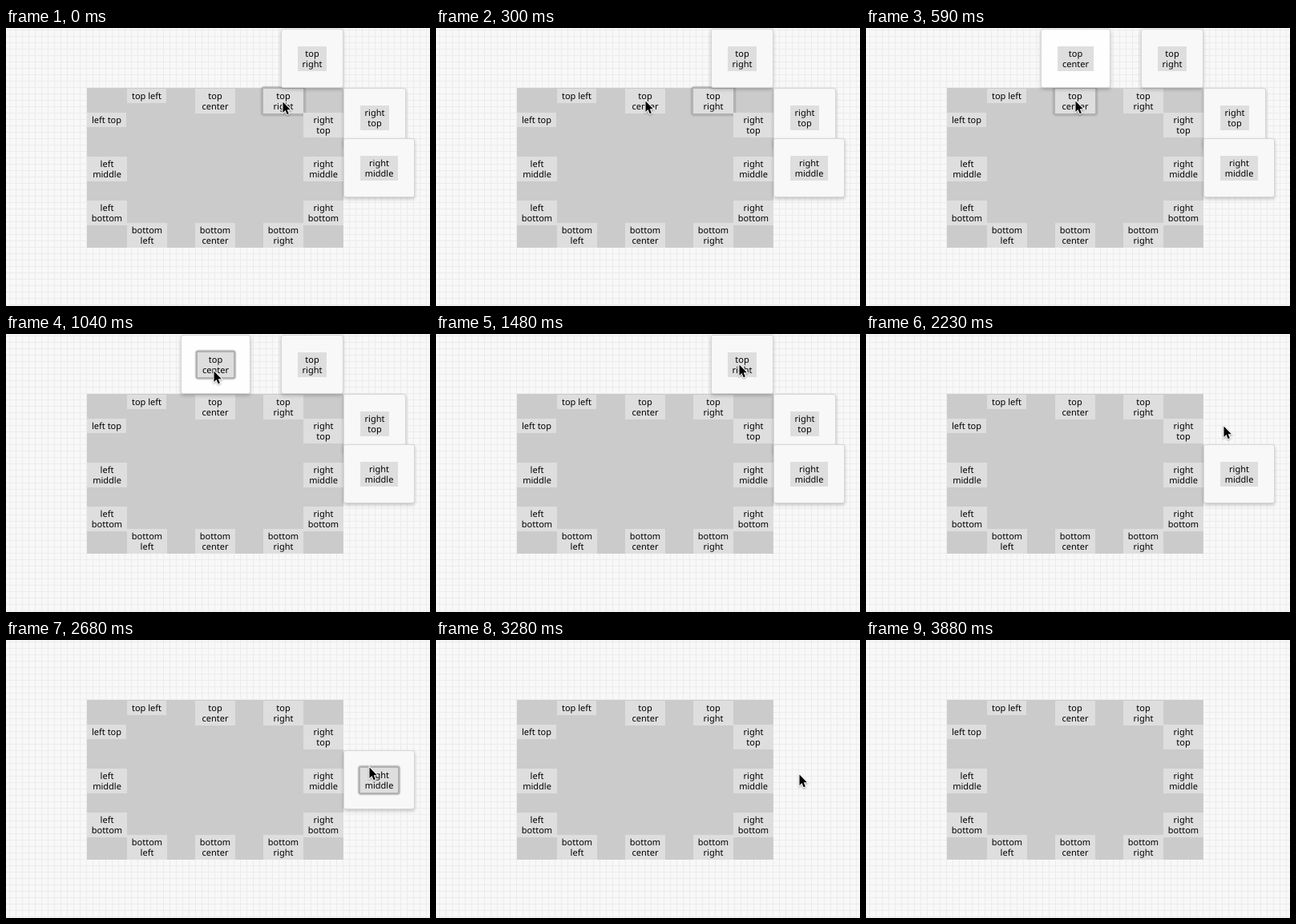
An HTML page with a canvas that plays this animation: 529 by 348 pixels, repeating every 4.18 s.

```html
<!DOCTYPE html>
<html lang="en">
<head>
<meta charset="utf-8">
<title>Popover placement</title>
<style>
  html, body { margin: 0; width: 100%; height: 100%; overflow: hidden; background: #f8f8f8; }
  canvas { display: block; }
</style>
</head>
<body>
<canvas id="stage" width="529" height="348"></canvas>
<script>
const ctx = document.getElementById('stage').getContext('2d');
const WIDTH = 529, HEIGHT = 348, LOOP = 4180, GRID = 8;

// label, x, y, width
const buttons = [
  ['top left', 151, 76, 49], ['top center', 236, 76, 50], ['top right', 321, 76, 50],
  ['left top', 101, 106, 49], ['left middle', 101, 161, 50], ['left bottom', 101, 216, 50],
  ['right top', 371, 106, 50], ['right middle', 371, 161, 50], ['right bottom', 371, 216, 50],
  ['bottom left', 151, 244, 50], ['bottom center', 236, 244, 50], ['bottom right', 321, 244, 50]
];

const popovers = [
  { label: 'top center', x: 218, y: 1, width: 87, from: 590, to: 1180, fill: '#fefefe' },
  { label: 'top right', x: 343, y: 1, width: 78, from: 0, to: 1630 },
  { label: 'right top', x: 421, y: 75, width: 78, from: 0, to: 2230 },
  { label: 'right middle', x: 421, y: 138, width: 89, from: 0, to: 2830 }
];

// Periods during which a button, on the panel or in a popover, holds focus
const focusPeriods = [
  { label: 'top right', from: 0, to: 440 },
  { label: 'top center', from: 440, to: 1040 },
  { label: 'top center', from: 1040, to: 1180, inPopover: true },
  { label: 'right middle', from: 2680, to: 2830, inPopover: true }
];

// time, x, y of the pointer tip
const pointerSteps = [
  [0, 345, 92], [150, 321, 91], [300, 261, 91], [740, 261, 89], [890, 259, 46],
  [1180, 259, 42], [1330, 373, 38], [1480, 378, 38], [1780, 413, 80], [1930, 438, 103],
  [2080, 441, 106], [2230, 446, 115], [2380, 452, 157], [2530, 453, 159], [2830, 453, 160],
  [3280, 453, 168], [3430, 470, 204], [3580, 482, 267], [3730, 487, 313]
];
const POINTER_END = 3880;
const arrow = new Path2D('M0 0V13.4L3 10.6L5.2 15.7L7.4 14.7L5.2 9.7H9.4Z');

const during = (item, t) => t >= item.from && t < item.to;

function rect(x, y, w, h, color) {
  ctx.fillStyle = color;
  ctx.fillRect(x, y, w, h);
}

function roundRect(x, y, w, h, radius, color) {
  ctx.fillStyle = color;
  ctx.beginPath();
  ctx.roundRect(x, y, w, h, radius);
  ctx.fill();
}

function withShadow(color, blur, offsetY, paint) {
  ctx.save();
  ctx.shadowColor = color;
  ctx.shadowBlur = blur;
  ctx.shadowOffsetY = offsetY;
  paint();
  ctx.restore();
}

function drawGrid() {
  rect(0, 0, WIDTH, HEIGHT, '#f8f8f8');
  for (let x = 4; x < WIDTH; x += GRID) rect(x, 0, 1, HEIGHT, '#ececec');
  for (let y = 2; y < HEIGHT; y += GRID) rect(0, y, WIDTH, 1, '#ececec');
}

function drawButton(label, x, y, width, focused) {
  const lines = /^(top left|left top)$/.test(label) ? [label] : label.split(' ');
  const height = 5 + 13 * lines.length;
  if (focused) {
    withShadow('rgba(0,0,0,.25)', 2, 0, () =>
      roundRect(x - 2.5, y - 2.5, width + 5, height + 5, 3, '#b2b2b2'));
  }
  rect(x, y, width, height, '#dedede');
  ctx.fillStyle = '#000';
  lines.forEach((line, i) => ctx.fillText(line, x + width / 2, y + 13 + 13 * i));
}

function drawPopover({ label, x, y, width, fill = '#f8f8f8' }, focused) {
  withShadow('rgba(0,0,0,.22)', 4, 2, () => roundRect(x, y, width, 74, 3, '#d6d6d6'));
  roundRect(x + 1, y + 1, width - 2, 72, 2, fill);
  drawButton(label, x + 21, y + 22, width - 42, focused);
}

function drawPointer(t) {
  if (t >= POINTER_END) return;
  const [, x, y] = pointerSteps.filter(step => step[0] <= t).pop();
  ctx.save();
  ctx.translate(x + 0.5, y + 0.5);
  ctx.lineWidth = 2;
  ctx.strokeStyle = '#fff';
  withShadow('rgba(0,0,0,.35)', 2, 1, () => ctx.stroke(arrow));
  ctx.fillStyle = '#000';
  ctx.fill(arrow);
  ctx.restore();
}

function draw(t) {
  const focus = focusPeriods.find(period => during(period, t));
  const hasFocus = (label, inPopover) =>
    focus && focus.label === label && !!focus.inPopover === inPopover;

  ctx.font = '11px "Noto Sans", sans-serif';
  ctx.textRendering = 'geometricPrecision';
  ctx.textAlign = 'center';
  drawGrid();
  rect(101, 75, 320, 200, '#cbcbcb');
  for (const [label, x, y, width] of buttons) {
    drawButton(label, x, y, width, hasFocus(label, false));
  }
  for (const popover of popovers) {
    if (during(popover, t)) drawPopover(popover, hasFocus(popover.label, true));
  }
  drawPointer(t);
}

const start = performance.now();
function tick() {
  draw((performance.now() - start) % LOOP);
  requestAnimationFrame(tick);
}
tick();
</script>
</body>
</html>
```
